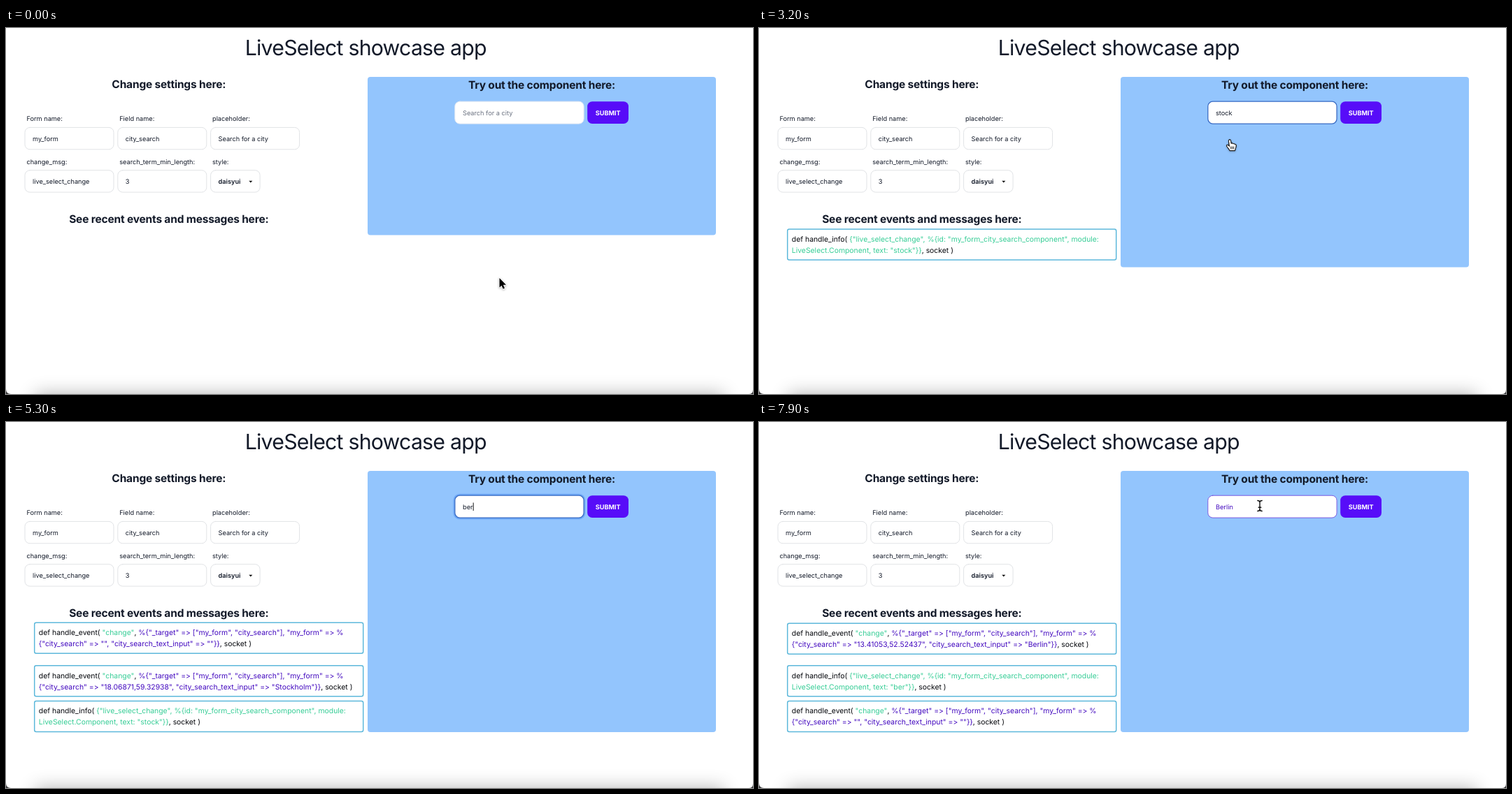
Write an HTML page with a canvas that moves like this. It is 1068 px wide and 524 px high and loops after 8 s.

```html
<!DOCTYPE html>
<html lang="en">
<head>
<meta charset="utf-8">
<title>Select component showcase</title>
<style>
  html, body { margin: 0; width: 100%; height: 100%; overflow: hidden; background: #fff; }
  canvas { display: block; width: 1068px; height: 524px; }
</style>
</head>
<body>
<canvas id="stage"></canvas>
<script>
const W = 1068, H = 524, LOOP = 8000;
const FONT = 'Inter, "Open Sans", sans-serif';
const INK = '#131a29', GREEN = '#36cd96', VIOLET = '#4208bf', BLACK = '#05070c';

const canvas = document.getElementById('stage');
const ctx = canvas.getContext('2d');
const dpr = window.devicePixelRatio || 1;
canvas.width = W * dpr;
canvas.height = H * dpr;
ctx.scale(dpr, dpr);
ctx.textRendering = 'geometricPrecision';
ctx.lineJoin = ctx.lineCap = 'round';

// ---------- helpers ----------
const clamp = (v, lo = 0, hi = 1) => Math.min(hi, Math.max(lo, v));
const mix = (a, b, k) => a + (b - a) * k;
const blend = (a, b, k) => `rgb(${a.map((v, i) => Math.round(mix(v, b[i], k))).join()})`;
const smooth = k => k * k * (3 - 2 * k);

function bezier(x1, y1, x2, y2) {
  const curve = (a, b, s) => 3 * (1 - s) ** 2 * s * a + 3 * (1 - s) * s * s * b + s ** 3;
  return x => {
    let lo = 0, hi = 1;
    for (let i = 0; i < 24; i++) {
      const mid = (lo + hi) / 2;
      if (curve(x1, x2, mid) < x) lo = mid; else hi = mid;
    }
    return curve(y1, y2, lo);
  };
}

function box(x, y, w, h, r, fill, stroke, width = 1) {
  ctx.beginPath();
  ctx.roundRect(x, y, w, h, r);
  if (fill) { ctx.fillStyle = fill; ctx.fill(); }
  if (stroke) { ctx.strokeStyle = stroke; ctx.lineWidth = width; ctx.stroke(); }
}

function setFont(size, weight = 400, spacing = 0) {
  ctx.font = `${weight} ${size}px ${FONT}`;
  ctx.letterSpacing = spacing * size + 'px';
}

function text(str, x, y, color = INK, align = 'left') {
  ctx.fillStyle = color;
  ctx.textAlign = align;
  ctx.fillText(str, x, y);
}

// Draws coloured pieces one after another; "=" and ">" stay separate glyphs.
function run(pieces, x, y) {
  for (const [color, str] of pieces) {
    for (const part of str.split(/(?<==)(?=>)/)) {
      text(part, x, y, color);
      x += ctx.measureText(part).width;
    }
  }
}

// ---------- event log ----------
const TAIL = [BLACK, ', socket )'];

const info = (at, term) => ({ at, lines: [
  [[BLACK, 'def handle_info( '],
   [GREEN, '{"live_select_change", %{id: "my_form_city_search_component", module:']],
  [[GREEN, `LiveSelect.Component, text: "${term}"}}`], TAIL],
] });

const change = (at, value, label) => ({ at, lines: [
  [[BLACK, 'def handle_event( '], [GREEN, '"change"'], [BLACK, ', '],
   [VIOLET, '%{"_target" => ["my_form", "city_search"], "my_form" => %']],
  [[VIOLET, `{"city_search" => "${value}", "city_search_text_input" => "${label}"}}`], TAIL],
] });

const LOG = [
  info(2420, 'stock'),
  change(3290, '18.06871,59.32938', 'Stockholm'),
  change(4450, '', ''),
  info(5320, 'ber'),
  change(7130, '13.41053,52.52437', 'Berlin'),
];
const ROW = 50.7, BOUNCE = 870;
const fall = bezier(.8, 0, 1, 1), rise = bezier(0, 0, .2, 1);

function bounceOffset(age) {
  if (age >= BOUNCE) return 0;
  const p = age / 1000;
  return -11.25 * (p < .5 ? 1 - fall(p * 2) : rise(p * 2 - 1));
}

const recentEvents = t => LOG.filter(e => e.at <= t).slice(-3).reverse();

function drawLog(events, t) {
  events.forEach((e, i) => {
    const y = 298 + i * ROW + (i ? 0 : bounceOffset(t - e.at));
    box(40.7, y, 470, 44, 2.5, '#fff', '#5db8db', 1.5);
    setFont(10.4);
    e.lines.forEach((line, n) => run(line, 46.8, y + 18 + n * 16));
  });
}

// ---------- search input ----------
const TYPED = [
  [0, ''], [1500, 's'], [1800, 'st'], [1900, 'sto'], [2000, 'stoc'], [2200, 'stock'],
  [3290, 'Stockholm'], [4300, ''], [4950, 'b'], [5100, 'be'], [5240, 'ber'], [7110, 'Berlin'],
];
const FOCUS = [[1000, 3110], [4300, 7110]];
const isSelected = t => (t >= 3290 && t < 4300) || t >= 7110;

function drawInput(t) {
  const focus = FOCUS.find(([on, off]) => t >= on && t < off);
  const value = TYPED.filter(([at]) => at <= t).pop()[1];
  if (focus) {
    const glow = clamp((t - focus[0]) / 200);
    box(641.6, 105, 184.6, 32.2, 7, null, `rgba(60,128,235,${.42 * glow})`, 4.4);
  }
  const outlined = focus || (t >= 3110 && t < 3290);
  const edge = outlined ? '#3a6cc4' : isSelected(t) ? '#7a5be0' : '#e2e9f3';
  box(641.8, 105.2, 184.3, 31.9, 7, '#fff', edge, outlined ? 1.3 : 1);

  setFont(9.2);
  if (value) text(value, 653, 124.8, isSelected(t) ? VIOLET : INK);
  else text('Search for a city', 653, 124.8, '#6b7280');
  if (focus) {
    ctx.fillStyle = '#111';
    ctx.fillRect(653.2 + ctx.measureText(value).width, 115.5, 1, 11.5);
  }
}

// ---------- dropdown ----------
const MENUS = [
  { on: 2420, off: 3110, items: [['Stockholm']] },
  { on: 5320, off: 7110, items: [
    ['Uberlândia', 6210, 6340], ['São Bernardo do Campo', 6340, 6552],
    ['Berlin', 6552, 7200], ['Naberezhnyye Chelny'],
  ] },
];
const openMenu = t => MENUS.find(m => t >= m.on && t < m.off);

function highlight(t, on, off) {
  if (on === undefined) return 0;
  return clamp(clamp((Math.min(t, off) - on) / 200) - Math.max(0, t - off) / 200);
}

function drawMenu(t, mouse) {
  const menu = openMenu(t);
  if (!menu) return;
  box(642, 138, 184, 10.3 + 24 * menu.items.length, 11, '#f2f2f2', 'rgba(90,100,125,.18)');
  setFont(9.2);
  menu.items.forEach(([label, on, off], i) => {
    const y = 142.8 + 24 * i;
    const k = highlight(t, on, off);
    if (mouse && mouse.y > y && mouse.y < y + 24) box(647, y, 173, 24, 5, '#dfe0e3');
    if (k) box(647, y, 173, 24, 5, blend([242, 242, 242], [87, 13, 248], k));
    text(label, 657.6, y + 15.2, blend([31, 41, 55], [255, 255, 255], k));
  });
}

// ---------- mouse ----------
// Each path holds [time, x, y] stops; outside them the mouse is hidden.
const PATHS = [
  [[0, 705.5, 358], [60, 705.5, 358], [900, 695, 124], [1550, 695, 124]],
  [[2600, 695, 124], [3000, 673.5, 160], [3280, 673.5, 160], [3900, 695, 130], [4950, 695, 130]],
  [[7450, 695, 130], [7850, 716, 120], [8000, 716, 120]],
];

function mouseAt(t) {
  const path = PATHS.find(p => t >= p[0][0] && t < p[p.length - 1][0]);
  if (!path) return null;
  const i = path.findIndex(stop => stop[0] > t);
  const [a, b] = [path[i - 1], path[i]];
  const k = smooth((t - a[0]) / (b[0] - a[0]));
  return { x: mix(a[1], b[1], k), y: mix(a[2], b[2], k) };
}

const ARROW = new Path2D('M0 0V13.4L3 10.7L5.2 15.6L7.5 14.6L5.4 9.8H9.5Z');
const BEAM = new Path2D('M-3.2-7.5Q0-7.5 0-5Q0-7.5 3.2-7.5M0-5V5M-3.2 7.5Q0 7.5 0 5Q0 7.5 3.2 7.5M-1.8 2.2H1.8');
const HAND = new Path2D('M-2 1.4C-2-.5.8-.5 1 1.4L1.6 5.6C2.2 4.6 4 4.8 4.2 6C5 5.2 6.4 5.6 6.6 6.7'
  + 'C7.6 6.2 8.6 7 8.6 8.3C8.8 11 7.4 12.4 7 15.5H-.4C-1 13.2-3.4 11.6-4.8 9C-5.4 7.4-3.6 6.8-2.6 8L-1.2 9.4Z');

function drawMouse(t, m) {
  if (!m) return;
  const overInput = m.x > 642 && m.x < 826 && m.y > 105 && m.y < 137;
  const hand = (openMenu(t) && m.y >= 138) || (t >= 3110 && t < 3340);
  ctx.save();
  ctx.translate(m.x, m.y);
  if (overInput) {
    for (const [color, width] of [['rgba(255,255,255,.9)', 3], ['#111', 1.4]]) {
      ctx.strokeStyle = color;
      ctx.lineWidth = width;
      ctx.stroke(BEAM);
    }
  } else {
    const shape = hand ? HAND : ARROW;
    ctx.shadowColor = 'rgba(0,0,0,.3)';
    ctx.shadowBlur = 3 * dpr;
    ctx.shadowOffsetY = dpr;
    ctx.strokeStyle = hand ? '#111' : '#fff';
    ctx.lineWidth = hand ? 1.3 : 1.8;
    ctx.stroke(shape);
    ctx.shadowColor = 'transparent';
    ctx.fillStyle = hand ? '#fff' : '#000';
    ctx.fill(shape);
    if (hand) {
      ctx.lineWidth = .9;
      ctx.stroke(shape);
      ctx.stroke(new Path2D('M1.2 10V13M3.2 10V13M5.2 10V13'));
    }
  }
  ctx.restore();
}

// ---------- page ----------
const FIELDS = [
  ['Form name:', 'my_form', 0, 0], ['Field name:', 'city_search', 1, 0],
  ['placeholder:', 'Search for a city', 2, 0], ['change_msg:', 'live_select_change', 0, 1],
  ['search_term_min_length:', '3', 1, 1], ['style:', 'daisyui', 2, 1],
];

function drawFields() {
  for (const [label, value, col, row] of FIELDS) {
    const x = 27 + col * 132.8, y = 142.4 + row * 61.3;
    const select = label === 'style:';
    box(x, y, select ? 70.5 : 127, 31.4, 7, '#fff', '#e1e3e6');
    setFont(9.2);
    text(label, x + 2.4, y - 9.1);
    setFont(9.2, select ? 600 : 400);
    text(value, x + 11, y + 19.4);
  }
  ctx.fillStyle = '#111';
  ctx.fill(new Path2D('M347.3 218.8H352.3L349.8 221.4Z'));
}

function drawWindowEdge() {
  ctx.save();
  ctx.shadowColor = 'rgba(0,0,0,.3)';
  ctx.shadowBlur = 26 * dpr;
  ctx.fillStyle = '#000';
  ctx.fillRect(42, H, 984, 60);
  ctx.restore();
  ctx.fillStyle = '#3a3a3c';
  ctx.fill(new Path2D(`M0 517Q0 ${H} 7 ${H}H0Z`));
  ctx.fill(new Path2D(`M${W} 518Q${W} ${H} ${W - 6} ${H}H${W}Z`));
}

function draw(t) {
  const events = recentEvents(t);
  const mouse = mouseAt(t);
  ctx.fillStyle = '#fff';
  ctx.fillRect(0, 0, W, H);
  drawWindowEdge();

  const bottom = events.length ? 291.8 + ROW * events.length : 296.6;
  box(517, 70, 498, bottom - 70, 4, '#93c5fd');

  setFont(30.3, 400, -.026);
  text('LiveSelect showcase app', 514.2, 38.7, INK, 'center');
  setFont(15.5, 700, -.012);
  text('Change settings here:', 232.8, 86.4, INK, 'center');
  text('Try out the component here:', 766, 87, INK, 'center');
  text('See recent events and messages here:', 232.8, 279, INK, 'center');

  drawFields();
  drawLog(events, t);

  box(831.2, 105.3, 58.8, 31.8, 7, '#570df8');
  setFont(9.2, 700);
  text('SUBMIT', 860.7, 124.8, '#fff', 'center');

  drawInput(t);
  drawMenu(t, mouse);
  drawMouse(t, mouse);
}

function tick() {
  draw(performance.now() % LOOP);
  requestAnimationFrame(tick);
}
tick();
</script>
</body>
</html>
```
